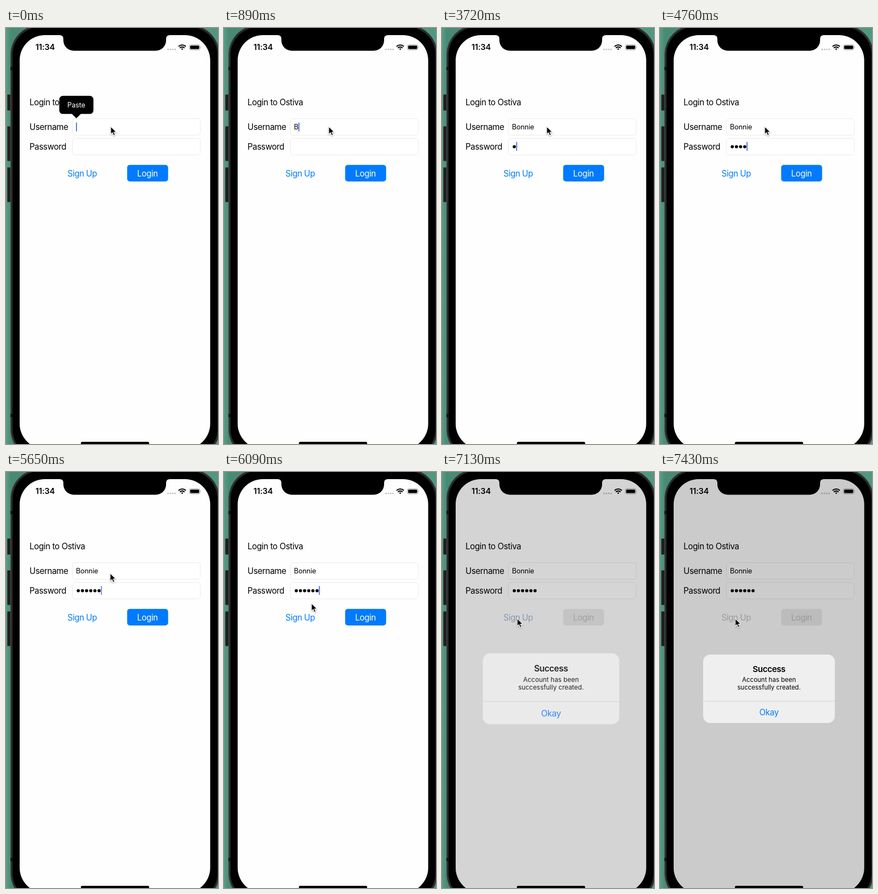
Write an HTML page that moves like this. It is 388x759 px and loops after 8000 ms.

```html
<!DOCTYPE html>
<html lang="en">
<head>
<meta charset="utf-8">
<title>Login form</title>
<style>
html, body { margin: 0; width: 100%; height: 100%; overflow: hidden; }
svg { display: block; width: 388px; height: 759px; font: 15.2px Inter, "Liberation Sans", sans-serif; letter-spacing: -.025em; }
.small { font-size: 12.7px; letter-spacing: -.01em; }
.mid { text-anchor: middle; }
.field { fill: #fff; stroke: #ebebeb; }
</style>
</head>
<body>
<svg viewBox="0 0 388 759">
  <defs>
    <linearGradient id="wall">
      <stop offset="0" stop-color="#589d84"/>
      <stop offset=".025" stop-color="#488a74"/>
      <stop offset="1" stop-color="#52977f"/>
    </linearGradient>
    <clipPath id="glass"><rect x="25" y="13" width="348.7" height="755" rx="46"/></clipPath>
    <filter id="shade" x="-50%" y="-50%" width="200%" height="200%">
      <feDropShadow dx="0" dy="1" stdDeviation="1" flood-opacity=".4"/>
    </filter>
  </defs>

  <rect width="388" height="759" fill="url(#wall)"/>
  <g fill="#1d1f1f" stroke="#454848">
    <rect x="2.5" y="121.5" width="8" height="29" rx="1"/>
    <rect x="2.5" y="179.5" width="8" height="63" rx="1"/>
    <rect x="2.5" y="254.5" width="8" height="63" rx="1"/>
  </g>
  <rect x="8.5" y="-5.5" width="382" height="792" rx="54" fill="#2b2b2d" stroke="#4b4c4e"/>
  <rect x="12" y="-2" width="375" height="785" rx="51"/>
  <path d="M8 71h4v6h-4zM8 704h4v6h-4z" fill="#151516"/>

  <g clip-path="url(#glass)">
    <rect x="25" y="13" width="349" height="746" fill="#fefefe"/>
    <text x="54" y="40" font-size="14.6" font-weight="600" letter-spacing="-.15">11:34</text>
    <g fill="#c4c4c4">
      <circle cx="296.6" cy="39" r="1.6"/><circle cx="300.9" cy="39" r="1.6"/>
      <circle cx="305.2" cy="39" r="1.6"/><circle cx="309.5" cy="39" r="1.6"/>
    </g>
    <g fill="none" stroke="#000" stroke-width="2.1">
      <path d="M315.8 33.8a9.5 9.5 0 0 1 13.4 0M318.2 36.4a6.1 6.1 0 0 1 8.6 0"/>
      <path d="M322.5 40.2l-2-2.1a3 3 0 0 1 4 0z" fill="#000" stroke="none"/>
    </g>
    <rect x="335.5" y="30.5" width="19.5" height="9.5" rx="2.8" fill="none" stroke="#a0a0a0"/>
    <rect x="337" y="32" width="16.5" height="6.5" rx="1.5"/>
    <path d="M356 33.5q1.6 1.7 0 3.4z" fill="#a0a0a0"/>

    <text x="43" y="141">Login to Ostiva</text>
    <text x="43" y="186">Username</text>
    <text x="43" y="222">Password</text>
    <rect class="field" x="121.5" y="165.5" width="234" height="30" rx="4.5"/>
    <rect class="field" x="121.5" y="201.5" width="234" height="30" rx="4.5"/>
    <text id="user" class="small" x="128" y="185"></text>
    <g id="dots"></g>
    <rect id="caret" width="1.7" height="16" fill="#3c66dc"/>

    <text id="sign" class="mid" x="139.5" y="270.5">Sign Up</text>
    <rect id="button" x="221.7" y="249.8" width="75" height="30.2" rx="5"/>
    <text id="login" class="mid" x="259" y="270.5">Login</text>

    <g id="menu">
      <path d="M104 123.8h49.5a6.5 6.5 0 0 1 6.5 6.5v20a6.5 6.5 0 0 1-6.5 6.5H137l-8.2 8-8.2-8H104a6.5 6.5 0 0 1-6.5-6.5v-20a6.5 6.5 0 0 1 6.5-6.5z"/>
      <text class="small mid" x="128.7" y="144.5" fill="#fff">Paste</text>
    </g>

    <rect id="dim" x="25" y="13" width="349" height="746"/>
    <g id="alert" class="mid">
      <rect x="-120.5" y="-62.5" width="241" height="125" rx="13" fill="#efefef"/>
      <path d="M-120.5 22.5h241" stroke="#d2d2d2"/>
      <text y="-30.5" font-weight="600">Success</text>
      <g font-size="11.5" letter-spacing="0">
        <text y="-12.5">Account has been</text>
        <text y="1.8">successfully created.</text>
      </g>
      <text y="48.5" fill="#0a7aff">Okay</text>
    </g>
    <rect x="137" y="755" width="125" height="5" rx="2.5"/>
  </g>
  <path d="M98 12v1q7 0 7 7v2.5a19 19 0 0 0 19 19h150a19 19 0 0 0 19-19v-2.5q0-7 7-7v-1z"/>
  <path id="mouse" d="M0 0v14.2l3.2-3 2.2 5.2 2.6-1.1-2.2-5h4.6z" stroke="#fff" stroke-width="1.1" filter="url(#shade)"/>
</svg>
<script>
const $ = id => document.getElementById(id);
const name = "Bonnie";
const userKeys = [750, 1040, 1640, 1940, 2090, 2390];
const passKeys = [3720, 4020, 4460, 4760, 4900, 5200];
const blink = [[0, 1], [300, .5], [450, 0], [750, 1], [1490, .5], [1640, 1], [2830, .5],
  [2980, 0], [3130, 1], [5650, .85], [5790, 0], [6090, 1], [6840, 0]];
const popup = [[0, 1], [750, .5], [890, 0]];
// progress of the alert: dimming and settling
const shown = [[0, 0], [7130, .82], [7280, .96], [7430, 1]];

const at = (steps, t) => steps.filter(s => s[0] <= t).pop()[1];
const count = (keys, t) => keys.filter(k => k <= t).length;
const mix = (a, b, k) => `rgb(${a.map((v, i) => v + (b[i] - v) * k)})`;
const set = (id, attrs) => { for (const k in attrs) $(id).setAttribute(k, attrs[k]); };

function draw(t) {
  const typed = count(userKeys, t), dots = count(passKeys, t);
  $("user").textContent = name.slice(0, typed);
  $("dots").innerHTML = Array.from({ length: dots }, (_, i) =>
    `<circle cx="${132.3 + 7.6 * i}" cy="216.6" r="2.9"/>`).join("");
  const inPass = t >= 3130;
  const textWidth = inPass ? dots * 7.6 : typed ? $("user").getComputedTextLength() : 0;
  set("caret", { x: 128.1 + textWidth, y: inPass ? 208 : 172.5, opacity: at(blink, t) });
  set("menu", { opacity: at(popup, t) });

  const n = Math.max(0, Math.min(5, Math.floor((t - 5650) / 147.5) + 1)) / 5;
  const move = n * n * n * (n * (6 * n - 15) + 10);
  set("mouse", { transform: `translate(${191.7 - 54 * move ** 1.4} ${179.8 + 87.5 * move})` });

  const k = at(shown, t);
  set("dim", { opacity: .2 * k });
  set("sign", { fill: mix([0, 122, 255], [194, 194, 196], k) });
  set("button", { fill: k ? "#ebebec" : "#007aff" });
  set("login", { fill: k ? "#bebebf" : "#fff" });
  set("alert", { opacity: k, transform: `translate(199.5 395.5) scale(${1.2 - .2 * k})` });
}

let start;
function tick(now) {
  start ??= now;
  draw((now - start) % 8000);
  requestAnimationFrame(tick);
}
draw(0);
requestAnimationFrame(tick);
</script>
</body>
</html>
```
